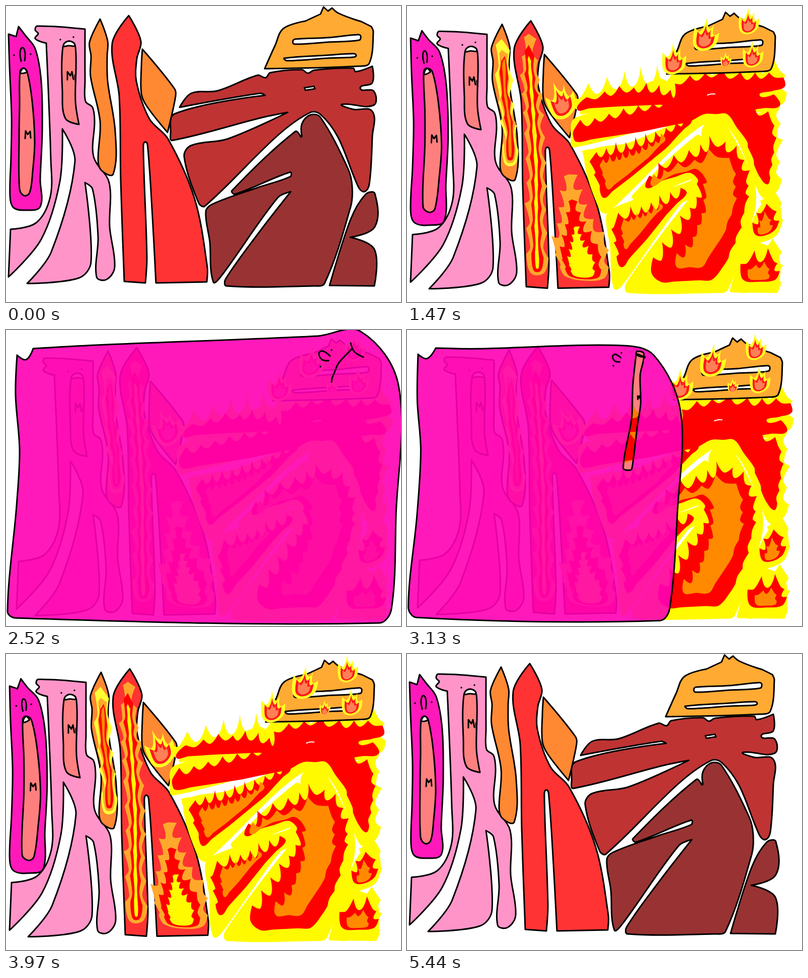
Recreate the animation shown at these times as an HTML page with a canvas. Size 785x590 px, loop 5.51 s.

```html
<!DOCTYPE html>
<html>
<head>
<meta charset="utf-8">
<style>
html, body { margin: 0; width: 100%; height: 100%; overflow: hidden; background: #fff; }
canvas { display: block; }
</style>
</head>
<body>
<canvas id="stage" width="785" height="590"></canvas>
<script>
const g = document.getElementById('stage').getContext('2d');
g.lineJoin = g.lineCap = 'round';
const YELLOW = '#fffa00', RED = '#f00', ORANGE = '#ff8a00', AMBER = '#ffa82b', SALMON = '#ff8080';
const clamp = v => Math.max(0, Math.min(1, v));
const noise = i => { const v = Math.sin(i * 12.9898) * 43758.5453; return v - Math.floor(v); };

const cache = new Map();
function memo(key, make) {
  if (!cache.has(key)) cache.set(key, make());
  return cache.get(key);
}

// "x,y" is a smooth point, "x,y*" a sharp corner
const parse = s => s.split(' ').map(p => {
  const [x, y] = p.replace('*', '').split(',').map(Number);
  return { x, y, sharp: p.endsWith('*') };
});

function curve(pts, closed = true) {
  const n = pts.length, path = new Path2D();
  const dir = i => {
    if (pts[i].sharp || (!closed && (i === 0 || i === n - 1))) return [0, 0];
    const a = pts[(i + n - 1) % n], b = pts[(i + 1) % n];
    const d = Math.hypot(b.x - a.x, b.y - a.y) || 1;
    return [(b.x - a.x) / d, (b.y - a.y) / d];
  };
  path.moveTo(pts[0].x, pts[0].y);
  for (let i = 0; i < (closed ? n : n - 1); i++) {
    const j = (i + 1) % n, p = pts[i], q = pts[j], [ax, ay] = dir(i), [bx, by] = dir(j);
    const l = Math.hypot(q.x - p.x, q.y - p.y) / 3;
    path.bezierCurveTo(p.x + ax * l, p.y + ay * l, q.x - bx * l, q.y - by * l, q.x, q.y);
  }
  if (closed) path.closePath();
  return path;
}

// Grows flame tips on a clockwise outline, tallest where an edge faces up
function jagged(pts, step, size) {
  const out = [];
  pts.forEach((p, i) => {
    const q = pts[(i + 1) % pts.length], dx = q.x - p.x, dy = q.y - p.y;
    const l = Math.hypot(dx, dy), n = Math.max(1, Math.round(l / step));
    const nx = dy / l, ny = -dx / l;
    for (let k = 0; k < n; k++) {
      out.push({ x: p.x + dx * k / n, y: p.y + dy * k / n, sharp: p.sharp && k === 0 });
      if (ny > .5) continue;
      const h = size * (.6 - .4 * ny) * (.6 + .8 * noise(out.length + i + p.x));
      const f = (k + .6) / n;
      out.push({ x: p.x + dx * f + nx * h * .7, y: p.y + dy * f + (ny * .5 - .7) * h, sharp: true });
    }
  });
  return curve(out);
}

const shape = s => memo(s, () => curve(parse(s)));
function paint(path, color) { g.fillStyle = color; g.fill(path); }
function ink(path, width = 3, color = '#000') { g.lineWidth = width; g.strokeStyle = color; g.stroke(path); }
function outlined(s, color) { paint(shape(s), color); ink(shape(s)); }
function line(s, width, color) { ink(memo('line' + s, () => curve(parse(s), false)), width, color); }
function dot(x, y) { g.fillStyle = '#000'; g.beginPath(); g.arc(x, y, 1.7, 0, 7); g.fill(); }

function spikes(s, color, step = 22, size = 14) {
  paint(memo(s + step, () => jagged(parse(s), step, size)), color);
}

// Nested flames: the same outline shrunk towards a hot spot
function fire(s, colors, scales, cx, cy, step = 24, size = 16) {
  colors.forEach((color, i) => {
    const m = scales[i];
    paint(memo(s + m, () => jagged(parse(s).map(p =>
      ({ x: cx + (p.x - cx) * m, y: cy + (p.y - cy) * m, sharp: p.sharp })), step * m, size * m)), color);
  });
}

// A tall flame along an axis, with one width per colour
function ribbon(axis, colors, widths, step) {
  colors.forEach((color, i) => {
    const w = widths[i];
    paint(memo(axis + w, () => {
      const [tip, ...rest] = parse(axis);
      const side = d => rest.map(p => ({ x: p.x + d, y: p.y - 5 * i }));
      return jagged([{ x: tip.x, y: tip.y + 22 * i, sharp: true }, ...side(w), ...side(-w).reverse()], step, w * 1.5);
    }), color);
  });
}

function flame(x, y, size, turn = 0) {
  if (size <= 0) return;
  g.save();
  g.translate(x, y);
  g.rotate(turn);
  [['#ffff22', 1], ['#ff1a1a', .7], ['#ff8055', .48]].forEach(([color, m]) => {
    g.save();
    g.translate(0, 12 * (1 - m));
    g.scale(size * m, size * m);
    paint(shape('0,-36* 7,-16 15,-26* 16,-5 26,-10* 22,14 0,28 -19,20 -21,-16* -10,-8'), color);
    g.restore();
  });
  g.restore();
}

// Shows a drawing below a jagged front that climbs from bottom to top
function rise(p, top, bottom, draw) {
  if (p <= 0) return;
  g.save();
  if (p < 1) {
    const front = bottom + (top - bottom) * p;
    g.beginPath();
    g.moveTo(-50, 700);
    for (let i = 0; i < 65; i++) g.lineTo(i * 14 - 50, front + (i % 2 ? 14 : -10) + 16 * noise(i) - 8);
    g.lineTo(850, 700);
    g.clip();
  }
  draw();
  g.restore();
}

const PINK = '62,40 157,46* 157,150 158,190 172,202 176,230 174,300 205,352 206,440 216,520 200,545 180,540 183,460 172,365 157,352* 169,510 145,542 42,553* 90,490 137,310 112,245* 107,350 70,465 5,540* 9,445* 60,432 88,380 89,305 80,74* 58,65 64,55 58,48';
const SLIM = '187,26* 202,70 201,100 202,150 217,250 213,335 190,328 183,308 187,230 168,140 169,100 166,72';
const FORK = '244,19* 268,70 260,105 259,150 285,225 322,265 375,385 400,520 399,550* 298,552* 291,420 282,285 277,271 273,285 280,500 277,552* 235,549* 228,350 225,180 211,75';
const SLIVER = '271,86* 335,165 337,180 321,252* 280,200 269,175 269,120';
const CROWN = '631,2* 640,10* 648,4* 660,14 696,28* 706,31* 726,41* 730,52 722,114 700,120 514,125* 535,78 551,45 595,30* 625,16*';
const ROOF = '345,202* 368,174 420,169 500,138 516,143 525,133 588,127 600,134 612,128 690,124 695,131 728,120* 728,153 704,164 731,170 730,198 668,196 690,206 728,210 728,260 722,355 712,370 700,360 660,262 625,216 605,212 540,258 395,399 383,393 354,300 368,278 440,265 560,212* 510,222 330,268 327,255 335,215 515,178* 505,174';
const LEG = '588,260* 588,235 605,217 625,222 680,325 688,360 685,400 633,553 610,558 438,558 436,545 500,455 566,370* 540,382 428,538 412,550 405,470 397,410 410,395 500,362 565,340 565,331 455,375 449,368 575,250 586,261*';
const FOOT = '733,374 715,375 685,425 643,557* 732,558* 732,485 684,461* 733,440';

function pinkGuy() {
  outlined(PINK, '#ff94c9');
  outlined('113,82 125,70 138,82 138,190 145,236* 118,224 112,170', SALMON);
  outlined('114,79 125,70 137,78 125,79', '#fff');
  line('122,147* 122,131* 128,139* 131,131* 134,146*');
  line('137,138 138,150');
  dot(108, 67);
  dot(134, 62);
}

function forkFire() {
  ribbon('240,45 242,120 250,230 255,330 255,420 257,522', [AMBER, RED, YELLOW], [13, 7, 2.5], 42);
  fire('319,325* 350,410 390,465 390,532 350,537 312,528 294,480 306,420', [AMBER, RED, YELLOW], [1, .75, .48], 345, 525, 34, 20);
}

function groundFire() {
  const colors = [YELLOW, RED, ORANGE];
  fire('401,470 440,465 456,485 412,552', colors, [1, .72, .45], 422, 525);
  fire('430,560 470,495 572,468 632,490 641,520 635,562 480,564', colors, [1, .68, .48], 545, 552, 32);
  fire('643,558 685,510 733,545 733,560', colors, [1, .75, .5], 690, 555);
}

function blaze() {
  for (const s of [ROOF, LEG, FOOT]) { paint(shape(s), YELLOW); ink(shape(s), 7, YELLOW); }
  g.translate(-16, -10);
  for (const edge of [
    '350,205 356,184 430,165 560,145 690,138 755,128 760,195 700,180 540,180',
    '378,285 430,380 408,408 372,330',
    '735,205 748,220 748,370 722,370',
    '725,382 752,380 750,450 720,455',
    '725,482 752,480 750,568 670,568'
  ]) spikes(edge, YELLOW, 34, 24);

  const hot = [RED, ORANGE];
  spikes('352,205 390,185 450,172 500,172 545,182 560,155 620,142 690,147 745,142 765,160 715,178 755,198 690,208 738,228 742,280 730,355 715,340 690,270 650,215 605,215 575,230 480,250 350,270 345,248 400,230 545,195 430,200', RED, 30, 12);
  fire('380,305 440,292 500,272 580,228 530,282 460,340 405,382', hot, [1, .65], 431, 334);
  spikes('490,362 530,322 590,300 630,280 672,302 688,350 686,395 668,460 645,515 620,545 520,550 500,532 540,480 575,425 600,380 592,345 575,332 520,348', RED, 28, 18);
  spikes('500,358 535,330 600,312 630,300 662,325 662,400 640,460 600,520 550,520 580,480 608,410 610,350 590,325 545,335', ORANGE, 28, 14);
  fire('425,440 450,423 510,405 570,372 530,415 490,465 440,520', hot, [1, .57], 460, 437);
  fire('706,455 718,412 740,405 746,445 725,457', hot, [1, .6], 722, 450);
  fire('682,545 690,512 743,508 746,545 715,549', hot, [1, .6], 712, 540);
  line('611,177 618,175 626,175', 2, '#fff');
}

// The magenta guy: each part as small, stretched and giant
const guy = Object.fromEntries(Object.entries({
  body: [
    '5,56* 20,61* 25,41* 38,58 58,85 70,150 72,250 68,345 68,400 40,407 15,402 8,380 10,300 11,220 7,120',
    '6,35* 24,43 46,24* 56,39 94,52 118,120 134,240 126,330 99,545 88,561 4,561 -14,528 2,390 12,230 7,150',
    '6,34* 24,43 38,21* 164,14 604,-4 689,-13 764,94 759,354 750,540 726,568 2,558 -13,545 5,334 11,224 3,114'],
  mouth: [
    '28,130 35,124 42,131 52,190 57,270 53,330 47,372 36,378 27,365 26,260 27,200',
    '54,52 58,39 94,52 118,120 134,240 126,330 99,545 88,561 50,562 86,320 79,175',
    '671,22 671,22 671,22 645,50 637,68 632,80 631,88 631,88 632,80 637,68 645,50'],
  tooth: [
    '28,134* 35,124 42,132* 35,134',
    '56,74* 54,46 63,44* 62,58',
    '669,10* 676,27 694,38* 676,27'],
  letter: [
    '38,264* 39,249* 43,256* 48,250* 49,263*',
    '106,248* 105,230* 112,238* 116,229* 118,244*',
    '645,50* 645,50* 645,50* 645,50* 645,50*'],
  nose: ['30,110 28,92 33,83 38,94 37,109', '43,57 39,56 37,52 39,49 43,50', '625,45 612,43 606,30 614,26 628,36'],
  eyes: ['16,98 49,96', '36,58 42,45', '609,57 631,24']
}).map(([name, poses]) => [name, poses.map(parse)]));

function magentaGuy(u, v) {
  const [from, to, p] = v > 0 ? [1, 2, v] : [0, 1, u];
  const pose = name => guy[name][from].map((a, i) => {
    const b = guy[name][to][i];
    return { x: a.x + (b.x - a.x) * p, y: a.y + (b.y - a.y) * p, sharp: a.sharp };
  });
  const [body, mouth, tooth] = ['body', 'mouth', 'tooth'].map(name => curve(pose(name)));
  const skin = new Path2D(body);
  skin.addPath(mouth);
  g.fillStyle = 'rgba(255,0,180,.9)';
  g.fill(skin, 'evenodd');
  paint(mouth, 'rgba(255,0,0,.5)');
  paint(tooth, '#fff');
  for (const path of [body, mouth, tooth]) ink(path);
  if (v < 1) ink(curve(pose('letter'), false));
  ink(curve(pose('nose'), false));
  pose('eyes').forEach(e => dot(e.x, e.y));
}

function draw(k) {
  const part = (a, b) => clamp((k - a) / (b - a));
  const u = part(20, 28), v = part(28, 36), burn = part(12, 20);
  g.setTransform(1, 0, 0, 1, 0, 0);
  g.fillStyle = '#fff';
  g.fillRect(0, 0, 785, 590);
  g.translate(16 * u, 10.5 * part(0, 3) + 5.5 * v);

  pinkGuy();
  outlined(SLIM, '#ff8833');
  rise(part(3, 9), 40, 320, () =>
    ribbon('186,55 190,110 192,170 203,250 203,305', ['#ffff33', AMBER, RED, ORANGE], [10, 7, 5, 2], 45));
  outlined(FORK, '#ff3333');
  rise(part(3, 11), 30, 545, forkFire);
  outlined(SLIVER, '#ff8833');
  flame(303, 181, 1.2 * part(3, 7), -.35);

  outlined(ROOF, '#bf3333');
  outlined('593,163* 612,160* 614,165* 595,168*', '#fff');
  outlined(LEG, '#993333');
  outlined(FOOT, '#993333');
  if (burn < 1) rise(part(7, 12), 430, 575, groundFire);
  rise(burn, 70, 575, blaze);

  outlined(CROWN, '#ffaa33');
  outlined('570,70 575,66 640,63 700,57 705,60 702,68 640,72 573,76', '#fff');
  outlined('553,104 640,98 692,95 696,99 690,102 640,104 558,109', '#fff');
  flame(676, 22, .85 * part(0, 3));
  flame(590, 50, 1.05 * part(0, 4), .12);
  flame(527, 98, part(1, 5));
  flame(684, 88, .85 * part(2, 6));
  flame(631, 97, .45 * part(3, 7));

  magentaGuy(u, v);
}

const start = performance.now();
function tick() {
  const t = (performance.now() - start) % 5510;
  draw(t < 2520 ? Math.floor(t / 70) : t < 2990 ? 36 : 35 - Math.floor((t - 2990) / 70));
  requestAnimationFrame(tick);
}
tick();
</script>
</body>
</html>
```
